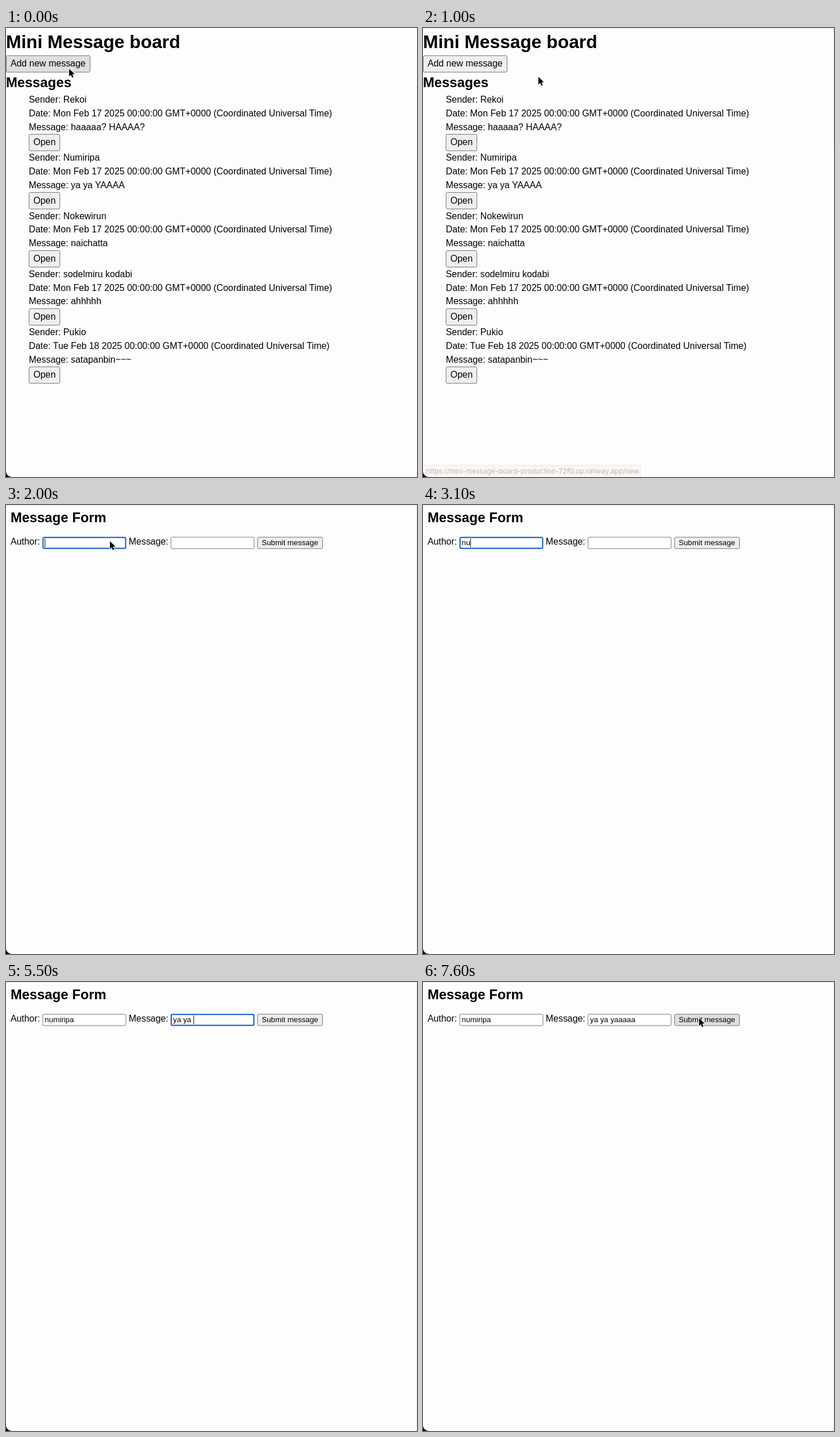
Write an HTML page that moves like this. It is 716 px wide and 782 px high and loops after 8000 ms.

```html
<!DOCTYPE html>
<html lang="en">
<head>
<meta charset="utf-8">
<title>Mini Message board</title>
<style>
  html, body { margin: 0; width: 716px; height: 782px; overflow: hidden; background: #000; }
  #stage { position: relative; width: 716px; height: 782px; overflow: hidden; background: #fdfdfd;
    border-bottom-left-radius: 10px; color: #000; font: 16px "Liberation Sans", Arial, sans-serif; }
  #stage > * { position: absolute; left: 0; top: 0; }
  .page { width: 720px; transform: scale(.9926); transform-origin: 0 0; white-space: pre; }
  h1, h2 { margin: 0; }
  h1 { font-size: 32px; }
  h2 { font-size: 24px; }
  .button { box-sizing: border-box; width: max-content; padding: 2px 7px;
    border: 1px solid #6f6f6f; border-radius: 3px; background: #efefef; }
  .button.hover { background: #dfdfdf; }
  #board { line-height: 1.5; }
  #list { padding-left: 40px; }
  #form h2 { position: absolute; left: 8px; top: 8px; line-height: 27px; }
  #row { position: absolute; left: 8px; top: 55.5px; height: 21px; display: flex; gap: 4.45px; align-items: center; }
  #row label { position: relative; top: -1px; }
  #row div { font-size: 13.333px; line-height: 15px; }
  .field { box-sizing: border-box; width: 147px; height: 21px; padding: 2px 3px;
    border: 1px solid #767676; border-radius: 2.5px; background: #fff; }
  .field.focus { padding: 1px 2px; border: 2px solid #0a56c9; border-radius: 3px; }
  .caret::after { content: ""; display: inline-block; height: 15px; margin-right: -1px;
    border-left: 1px solid #000; vertical-align: top; }
  #edge { box-sizing: border-box; width: 716px; border: solid #e6e6e6; border-width: 1px 1px 0 0; }
  #stage > #link { top: auto; bottom: 0; box-sizing: border-box; width: 379px; height: 21px; padding-left: 5px;
    border: solid #d8cfcd; border-width: 1px 1px 0 0; border-top-right-radius: 4px; background: #fdeeea;
    color: #737373; font: 12px/20px Inter, sans-serif; white-space: nowrap; }
</style>
</head>
<body>
<div id="stage">
  <div id="board" class="page"><h1>Mini Message board</h1><div id="add" class="button">Add new message</div><h2>Messages</h2><div id="list"></div></div>
  <div id="form" class="page"><h2>Message Form</h2><div id="row"><label>Author:</label><div id="author" class="field"></div><label>Message:</label><div id="message" class="field"></div><div id="submit" class="button">Submit message</div></div></div>
  <div id="edge"></div>
  <div id="link">https://mini-message-board-production-72f0.up.railway.app/new</div>
  <svg id="cursor" width="14" height="20" viewBox="-2 -2 14 20">
    <path d="M0 0V13.3L3.1 10.5 5.2 15.4 7.5 14.4 5.4 9.6H9.6Z" stroke="#fff" stroke-width="1.6" paint-order="stroke"/>
  </svg>
</div>
<script>
const $ = id => document.getElementById(id);

const posts = [
  ["Rekoi", "Mon Feb 17", "haaaaa? HAAAA?"],
  ["Numiripa", "Mon Feb 17", "ya ya YAAAA"],
  ["Nokewirun", "Mon Feb 17", "naichatta"],
  ["sodelmiru kodabi", "Mon Feb 17", "ahhhhh"],
  ["Pukio", "Tue Feb 18", "satapanbin~~~"]
];
$("list").innerHTML = posts.map(([sender, day, text]) =>
  `<div>Sender: ${sender}</div>` +
  `<div>Date: ${day} 2025 00:00:00 GMT+0000 (Coordinated Universal Time)</div>` +
  `<div>Message: ${text}</div><div class="button">Open</div>`).join("");

const LOOP = 8000, STEP = 100, FORM_AT = 1100;
const fields = [
  { el: $("author"), text: "numiripa", focus: 2000, blur: 4400,
    keys: [2900, 3100, 3500, 3600, 3700, 3900, 4000, 4100] },
  { el: $("message"), text: "ya ya yaaaaa", focus: 4400, blur: 7500,
    keys: [4700, 4800, 5200, 5400, 5400, 5500, 5800, 5900, 6000, 6200, 6400, 6500] }
];

// Each point is [time, x, y]
const path = [
  [400, 110, 71], [1000, 201, 85], [1100, 214, 85], [1200, 214, 85], [1700, 181, 63],
  [6400, 181, 63], [6650, 330, 78], [6900, 431, 63], [7200, 479, 63], [7300, 481, 63]
];
const fade = [[300, 0], [500, 1], [800, 1], [1000, .5], [1100, 0]];

function along(points, t) {
  const next = points.findIndex(p => p[0] > t);
  if (next < 0) return points[points.length - 1].slice(1);
  if (next === 0) return points[0].slice(1);
  const a = points[next - 1], b = points[next], k = (t - a[0]) / (b[0] - a[0]);
  return a.slice(1).map((v, i) => v + (b[i + 1] - v) * k);
}

function drawField({ el, text, focus, blur, keys }, t) {
  const typed = keys.filter(k => k <= t).length;
  const active = t >= focus && t < blur;
  const lastChange = typed ? keys[typed - 1] : focus;
  el.textContent = text.slice(0, typed);
  el.classList.toggle("focus", active);
  el.classList.toggle("caret", active && (t - lastChange) % 1000 < 500);
}

function draw(now) {
  const t = Math.floor(now % LOOP / STEP) * STEP;
  const onForm = t >= FORM_AT;
  const [x, y] = along(path, t);
  $("board").hidden = onForm;
  $("form").hidden = !onForm;
  $("add").classList.toggle("hover", x < 146);
  $("submit").classList.toggle("hover", x > 437);
  $("edge").hidden = t < 400;
  $("edge").style.height = onForm ? "782px" : "207px";
  $("link").style.opacity = along(fade, t)[0];
  $("cursor").style.transform = `translate(${x - 2}px, ${y - 2}px)`;
  $("cursor").style.visibility = t >= 2900 && t < 6400 ? "hidden" : "visible";
  fields.forEach(f => drawField(f, t));
}

const start = performance.now();
function tick() {
  draw(performance.now() - start);
  requestAnimationFrame(tick);
}
tick();
</script>
</body>
</html>
```
